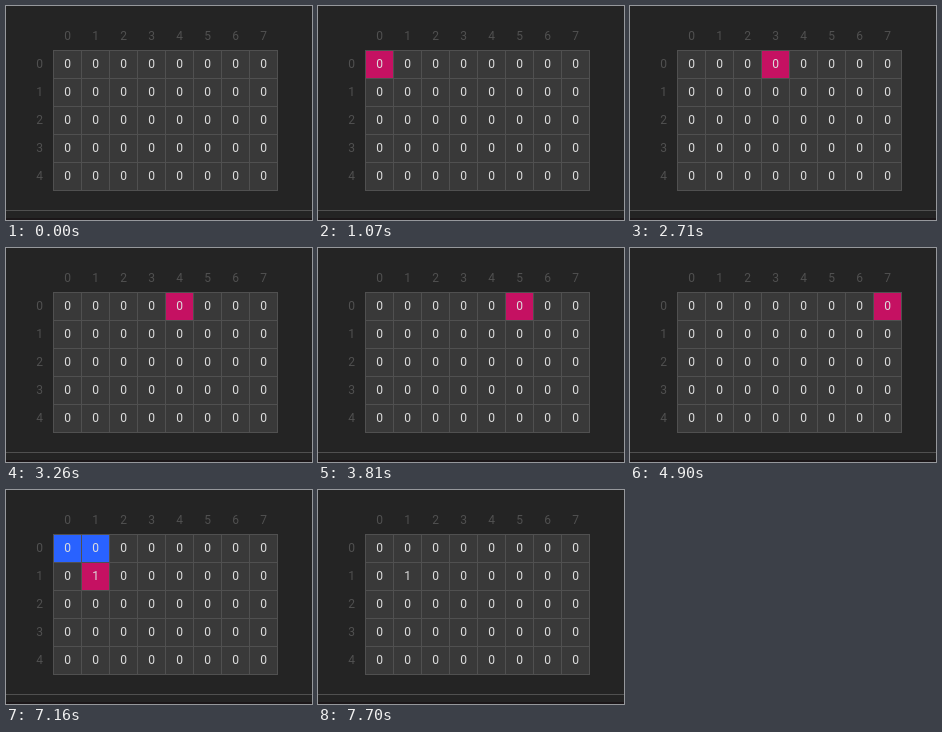
An HTML page for the animation above (8 s loop, 306x214 px).

```html
<!DOCTYPE html>
<html lang="en">
<head>
<meta charset="utf-8">
<title>Table fill</title>
<style>
html, body { margin: 0; width: 100%; height: 100%; overflow: hidden; background: #242424; }
#stage { position: relative; width: 306px; height: 214px; overflow: hidden; }
#stage div {
  position: absolute; box-sizing: border-box; width: 29px; height: 29px;
  border: 1px solid transparent; text-align: center;
  font: 12px/27px Roboto, sans-serif; color: #505050;
}
#stage .cell { background: #393939; border-color: #505050; color: #ddd; }
#stage .patched { background: #c51162; }
#stage .selected { background: #2962ff; }
#stage hr { position: absolute; left: 0; top: 204px; width: 100%; height: 1px; margin: 0; border: 0; background: #505050; }
#stage hr + hr { top: 212px; height: 2px; background: #1c1719; }
</style>
</head>
<body>
<div id="stage"><hr><hr></div>
<script>
const LOOP = 8000, ROWS = 5, COLS = 8;
const stage = document.getElementById('stage');
const cells = [];

function addBox(row, col, text, name = '') {
  const box = document.createElement('div');
  box.className = name;
  box.textContent = text;
  box.style.left = 47 + 28 * col + 'px';
  box.style.top = 44 + 28 * row + 'px';
  stage.append(box);
  return box;
}

for (let c = 0; c < COLS; c++) addBox(-1, c, c);
for (let r = 0; r < ROWS; r++) {
  addBox(r, -1, r);
  cells.push(Array.from({ length: COLS }, (_, c) => addBox(r, c, 0, 'cell')));
}

// Times at which the patched cell moves on; the last one clears it.
const steps = [1070, 1610, 2160, 2710, 3260, 3810, 4360, 4900, 5520, 5990];

function stateOf(r, c, t) {
  const i = r * COLS + c;
  if (t >= steps[i] && t < steps[i + 1]) return ' patched';
  if (r === 0 && c < 2 && t >= 6610 && t < 7700) return ' selected';
  if (r === 1 && c === 1 && t >= 7160 && t < 7700) return ' patched';
  return '';
}

function draw(now) {
  const t = now % LOOP;
  cells.forEach((row, r) => row.forEach((cell, c) => {
    cell.className = 'cell' + stateOf(r, c, t);
  }));
  cells[1][1].textContent = t >= 7160 ? 1 : 0;
}

const start = performance.now();
function tick() {
  draw(performance.now() - start);
  requestAnimationFrame(tick);
}
tick();
</script>
</body>
</html>
```
